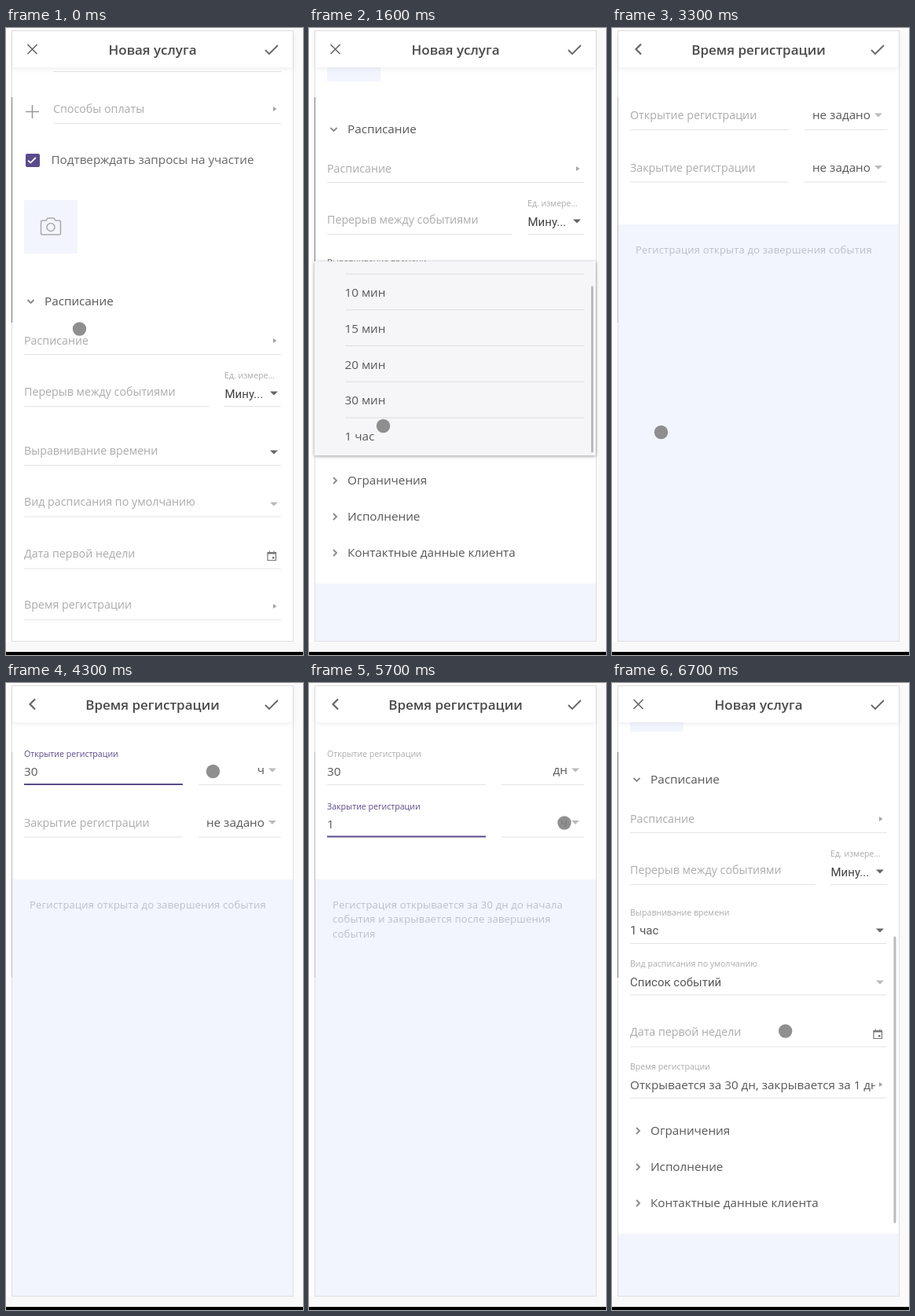
Write an HTML page that moves like this. It is 378 by 798 pixels and loops after 6800 ms.

```html
<!DOCTYPE html>
<html lang="ru">
<head>
<meta charset="utf-8">
<style>
html, body { margin: 0; width: 100%; height: 100%; overflow: hidden; background: #fdfdfd; }
svg { display: block; font-family: "Open Sans", "Noto Sans", sans-serif; }
.ui { font-family: Roboto, "Open Sans", sans-serif; }
.hint { letter-spacing: .2px; }
.bar { filter: drop-shadow(0 2px 3px #0001); }
.menu { filter: drop-shadow(0 1px 2px #0006); }
</style>
</head>
<body>
<svg id="stage" width="378" height="798"></svg>
<script>
const LOOP = 6800, STEP = 100;
const PURPLE = '#5b4a8c', PALE = '#f2f5fd', GREY = '#ababab', DARK = '#585858';
const BODY = 15.25, HOLDER = 14.25, LABEL = 10.6, SELECT = 15;
const stage = document.getElementById('stage');

// Cursor track: time, x, y
const cursorKeys = [
  [0, 93.5, 383], [100, 93.5, 385], [500, 93.5, 385], [700, 95, 330], [1000, 100, 170], [1200, 94, 320],
  [1300, 94, 390], [1400, 94, 440], [1500, 95, 480], [1600, 94.5, 506.5], [1800, 88, 519], [2000, 82, 480],
  [2300, 74, 386], [2500, 70, 410], [2700, 66.5, 462.5], [2800, 64, 480], [3000, 62.5, 514.5], [3300, 62.5, 514.5],
  [3600, 90, 114], [4000, 100, 114], [4400, 318, 112], [4500, 318, 114], [4800, 255.5, 254],
  [4900, 240, 246], [5000, 225, 240], [5300, 110, 178], [5400, 115, 178], [5700, 325, 178],
  [5800, 325, 178], [6000, 245, 300], [6100, 240, 309], [6400, 338, 30], [6500, 338, 30], [6700, 220.700, 443]
];
const scrollKeys = [[0, 0], [500, 0], [600, 25], [800, 120], [1000, 200], [1200, 219], [6500, 219], [6700, 225]];

function at(keys, t) {
  const i = keys.findIndex(k => k[0] > t);
  if (i < 0) return keys[keys.length - 1].slice(1);
  const a = keys[i - 1], b = keys[i], p = (t - a[0]) / (b[0] - a[0]);
  return a.slice(1).map((v, j) => v + (b[j + 1] - v) * p);
}

const rect = (x, y, w, h, fill, more = '') =>
  `<rect x="${x}" y="${y}" width="${w}" height="${h}" fill="${fill}" ${more}/>`;
const line = (x1, x2, y, fill = '#e3e3e3', h = 1) => rect(x1, y, x2 - x1, h, fill);
const path = (d, color, w = 1.6) => `<path d="${d}" fill="none" stroke="${color}" stroke-width="${w}"/>`;
// y is the middle of the capitals
const text = (x, y, str, size = HOLDER, fill = GREY, more = '') =>
  `<text x="${x}" y="${y + .36 * size}" font-size="${size}" fill="${fill}" ${more}>${str}</text>`;
const caret = (y, fill = '#666', x = 341) => `<path d="M${x - 5} ${y - 2.5}h10l-5 5z" fill="${fill}"/>`;
const arrow = y => `<path d="M340 ${y - 3}l4.5 3l-4.5 3z" fill="#a5a5a5"/>`;
const tick = (x, y, k, color, w) => path(`M${x - 8 * k} ${y + k}l${5 * k} ${5 * k}l${11 * k} ${-11 * k}`, color, w);

function field(y, label, value, active, size = BODY, more = '') {
  return (value || active ? text(23, y - 20.5, label, LABEL, active ? '#777' : GREY) : text(23, y, label))
    + `<svg width="335" height="1000">${text(23, y + 2.5, value, size, DARK, more)}</svg>`
    + line(23, 350, y + 18.5);
}

function section(y, label) {
  return path(`M31 ${y - 4}l4 4l-4 4`, '#888', 1.8) + text(49, y, label, BODY, DARK);
}

function form(t, s) {
  const align = t >= 1900 ? '1 час' : '';
  const view = t >= 2800 ? 'Список событий' : '';
  const reg = t >= 6400 ? 'Открывается за 30 дн, закрывается за 1 дн' : '';
  const ui = 'class="ui"';
  return `<g transform="translate(0 ${-s})">`
    + rect(8, 926, 357, 200, PALE)
    + line(60, 350, 55) + path('M25 106.5h17M33.5 98v17', '#999')
    + text(60, 103, 'Способы оплаты') + line(60, 350, 121) + arrow(103)
    + rect(25, 160, 18, 17, PURPLE, 'rx="2"') + tick(33, 168, .6, '#fff', 1.8)
    + text(57.5, 168, 'Подтверждать запросы на участие', BODY, '#666')
    + rect(23, 219, 68, 68, PALE)
    + path('M46.500 245h4.500l2-3h8l2 3h4.500q2 0 2 2v14q0 2-2 2h-21q-2 0-2-2v-14q0-2 2-2z', '#aaa', 1.5)
    + '<circle cx="57" cy="253.500" r="5" fill="none" stroke="#aaa" stroke-width="1.500"/>'
    + path('M27.500 346l4 4l4-4', '#888', 1.8) + text(49, 348, 'Расписание', BODY, DARK)
    + text(23, 398, 'Расписание') + line(23, 350, 415) + arrow(398)
    + text(23, 462.5, 'Перерыв между событиями') + line(23, 259, 481)
    + text(278, 442.5, 'Ед. измере...', LABEL) + text(278.5, 465.5, 'Мину...', SELECT, '#444', ui)
    + caret(465) + line(278, 350, 481)
    + field(537.5, 'Выравнивание времени', align, t >= 1300 && t < 2000, SELECT, ui) + caret(540)
    + field(603, 'Вид расписания по умолчанию', view, t >= 2400 && t < 2900, SELECT, ui) + caret(606, '#bbb')
    + field(669, 'Дата первой недели', '')
    + path('M333 667.500h10.500v10h-10.500z', '#777', 1.2) + rect(333, 667, 10.5, 2.5, '#777')
    + rect(339, 673, 2.5, 2.5, '#777') + path('M335.500 665.500v2M341 665.500v2', '#777', 1.2)
    + field(734, 'Время регистрации', reg) + arrow(736)
    + section(795, 'Ограничения') + section(841, 'Исполнение') + section(887, 'Контактные данные клиента')
    + '</g>'
    + ((t >= 600 && t < 1300) || t >= 6600 ? rect(358.5, 210 + s / 2, 3, 365, '#bbb', 'rx="1.500"') : '');
}

function menu(top, height, first, items) {
  const rows = items.map((item, i) => {
    const y = first + 45.75 * i;
    return text(45.5, y, item, BODY, DARK) + (i < items.length - 1 ? line(46, 350, y + 21.5, '#dedee0') : '');
  }).join('');
  return `<g class="menu">${rect(7, top, 358, height, '#f6f6f9')}</g>`
    + `<svg y="${top}" width="378" height="${height}"><g transform="translate(0 ${-top})">${rows}</g></svg>`;
}

function menus(t) {
  if (t >= 1300 && t < 2000) {
    const [s] = at([[0, 0], [1300, 0], [1600, 41]], t);
    return menu(297, 247, 332 - s, ['5 мин', '10 мин', '15 мин', '20 мин', '30 мин', '1 час'])
      + rect(359, 298 + s * .74, 3, 212, '#bbb', 'rx="1.500"');
  }
  if (t >= 2400 && t < 2900) {
    return menu(362, 140, 387.5, ['День', 'Афиша', 'Список событий'])
      + `<circle cx="26.500" cy="${t < 2800 ? 387 : 479}" r="4" fill="#8b82b5"/>`;
  }
  return '';
}

function timeRow(y, label, value, unit, active) {
  const color = active ? PURPLE : GREY;
  return (value || active ? text(23, y - 20.5, label, LABEL, color) : text(23, y, label))
    + text(23, y + 2, value, BODY, DARK)
    + (active ? line(23, 225, y + 17, PURPLE, 2) : line(23, 225, y + 18))
    + text(329, y, unit, BODY, DARK, 'text-anchor="end"') + caret(y, '#bbb', 339) + line(245, 350, y + 18);
}

function hint(t) {
  if (t < 4500) return ['Регистрация открыта до завершения события'];
  const open = `Регистрация открывается за 30 ${t < 4900 ? 'ч' : 'дн'} до начала`;
  return t < 5800
    ? [open, 'события и закрывается после завершения', 'события']
    : [open, `события и закрывается за 1 ${t < 6100 ? 'ч' : 'дн'} до начала`, 'события'];
}

function registration(t) {
  const openValue = t < 3800 ? '' : t < 4000 ? '3' : '30';
  const openUnit = t < 3800 ? 'не задано' : t < 4900 ? 'ч' : 'дн';
  const closeUnit = t < 5400 ? 'не задано' : t < 6100 ? 'ч' : 'дн';
  return rect(8, 250, 357, 530, PALE)
    + timeRow(111, 'Открытие регистрации', openValue, openUnit, t >= 3700 && t < 4500)
    + timeRow(177.5, 'Закрытие регистрации', t < 5400 ? '' : '1', closeUnit, t >= 5300 && t < 5800)
    + hint(t).map((str, i) => text(30, 282 + 18.5 * i, str, 13, '#bcbfc8', 'class="hint"')).join('');
}

function popup(t) {
  const first = t >= 4500 && t < 5000, second = t >= 5800 && t < 6200;
  if (!first && !second) return '';
  const y = first ? 139 : 205.5;
  const chosen = t < (first ? 4900 : 6100) ? 1 : 2;
  return rect(6, 3, 360, 778, '#000', 'opacity=".08"')
    + rect(170, y, 190, 165, '#fff', 'rx="6"')
    + `<path d="M288 ${y + 1}l9-9l9 9z" fill="#fff"/>`
    + ['мин', 'ч', 'дн', 'не задано'].map((item, i) =>
      text(185.5, y + 20.5 + 42 * i, item, 16, '#333', 'class="ui"')
      + (i < 3 ? line(185, 355, y + 39 + 42 * i, '#dcdcdc') : '')).join('')
    + tick(333, y + 20.5 + 42 * chosen, .65, PURPLE, 1.8)
    + rect(354, y + 3, 3, 158, '#a9a9a9', 'rx="1.500"');
}

function draw(t) {
  const onForm = t < 3200 || t >= 6500;
  const [s] = at(scrollKeys, t);
  const [x, y] = at(cursorKeys, t);
  stage.innerHTML =
    rect(366, 0, 12, 798, '#fafafa') + rect(7, 3, 358, 777, '#fff')
    + (onForm ? form(t, s) : registration(t))
    + rect(7.5, 3.5, 358, 777, 'none', 'stroke="#dfdfe3"')
    + rect(7, 88, 1, 287, onForm ? '#777' : '#bbb')
    + (onForm ? menus(t) : '')
    + rect(8, 0, 357, 3, '#fdfdfd')
    + `<g class="bar">${rect(8, 4, 357, 46, '#fff')}</g>`
    + (onForm ? path('M27.500 21l12 12M39.500 21l-12 12', '#666') : path('M37 20.500l-6.500 6.500l6.500 6.500', '#666', 2.2))
    + text(186.5, 28, onForm ? 'Новая услуга' : 'Время регистрации', 17, '#4a4a4a', 'font-weight="600" text-anchor="middle"')
    + tick(338, 27, 1, '#666', 1.8)
    + rect(0, 781, 378, 13, '#f9f9f9') + line(7, 366, 780, '#dfdfe3')
    + popup(t)
    + rect(0, 794, 378, 4, '#000')
    + `<circle cx="${x}" cy="${y}" r="8.700" fill="#808080" opacity=".88"/>`;
}

let shown = -1;
function tickFrame() {
  const t = Math.floor(performance.now() % LOOP / STEP) * STEP;
  if (t !== shown) draw(shown = t);
  requestAnimationFrame(tickFrame);
}
tickFrame();
</script>
</body>
</html>
```
